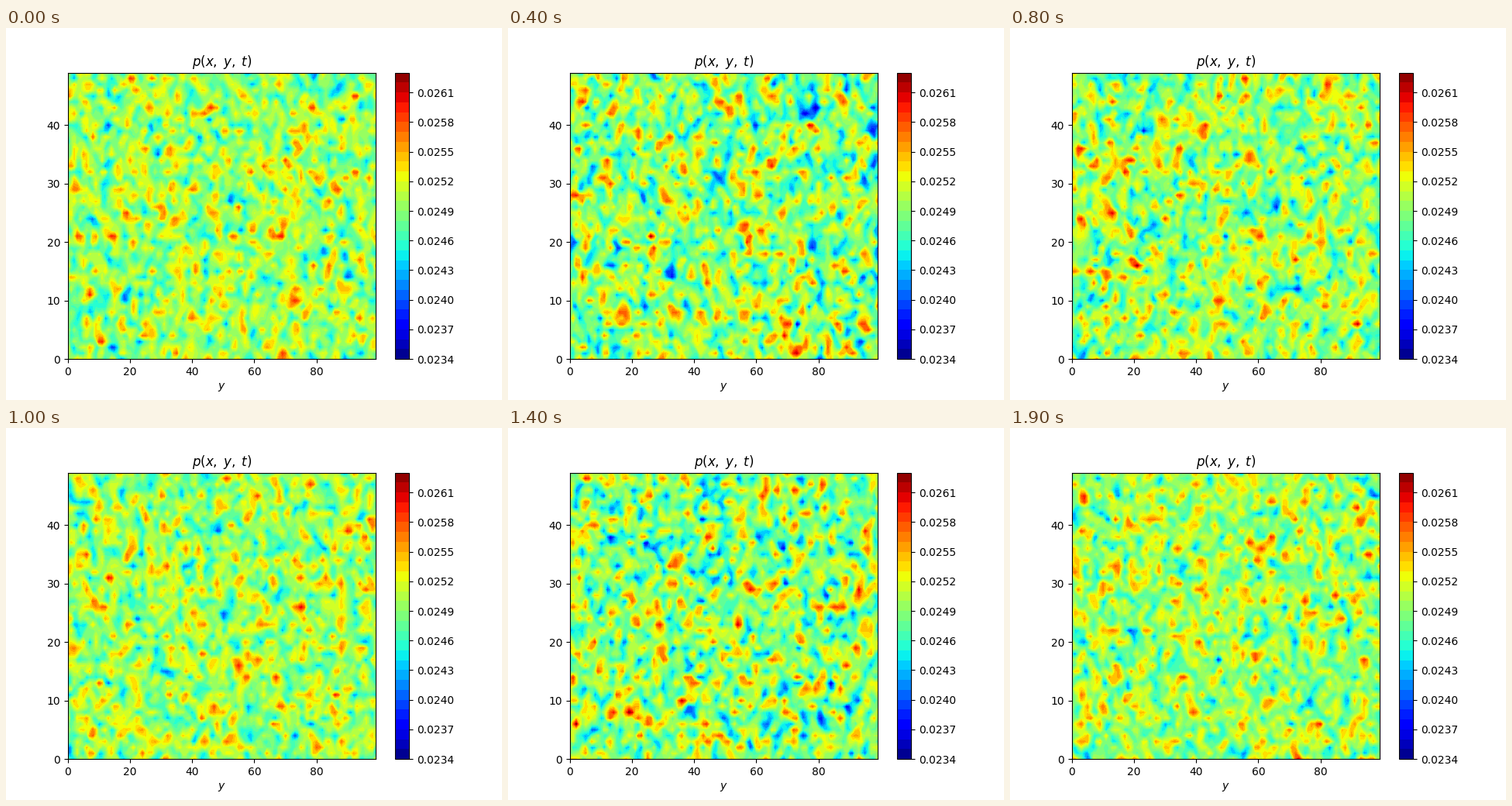
Recreate the animation shown at these times as a matplotlib script. Size 640 by 480 pixels, loop 2000 ms.

```python
import numpy as np
import matplotlib.pyplot as plt
from matplotlib.animation import FuncAnimation

FRAMES, STEP_MS = 20, 100
ROWS, COLS = 50, 100
LOW, HIGH = 0.0234, 0.0263
LEVELS = np.linspace(LOW, HIGH, 30)

# Whole-pixel letter spacing in the labels.
plt.rcParams["text.kerning_factor"] = 6


def blend(a, weight, axis):
    """Mix every cell with its two neighbours along one axis."""
    return a + weight * (np.roll(a, 1, axis) + np.roll(a, -1, axis))


def field(i):
    """Pressure on the grid for one time step."""
    rng = np.random.default_rng(700 + i)
    noise = rng.standard_normal((ROWS, COLS))
    noise = blend(blend(noise, 0.45, axis=1), 0.12, axis=0)
    noise /= noise.std()

    # The mean and the spread swing in opposite directions, twice a loop.
    swing = np.cos(4 * np.pi * i / FRAMES)
    mean = 0.02491 + 0.00004 * swing
    spread = 0.00036 - 0.00004 * swing
    return np.clip(mean + spread * noise, LOW + 1e-6, HIGH - 1e-6)


def contours(i):
    return ax.contourf(field(i), levels=LEVELS, cmap="jet")


fig, ax = plt.subplots(figsize=(6.4, 4.8), dpi=100)
plot = contours(0)
fig.colorbar(plot, ax=ax, ticks=LOW + 0.0003 * np.arange(10), format="%.4f")
ax.set_title(r"$p(x,\hspace{0.3}y,\hspace{0.3}t)$")
ax.set_xlabel("$y$")
ax.set_xticks(range(0, COLS, 20))
ax.set_yticks(range(0, ROWS, 10))
ax.set_xlim(0, COLS - 1)
ax.set_ylim(0, ROWS - 1)


def draw(i):
    global plot
    plot.remove()
    plot = contours(i)
    return [plot]


anim = FuncAnimation(fig, draw, frames=FRAMES, init_func=lambda: [],
                     interval=STEP_MS, repeat=True, repeat_delay=0)
plt.show()
```
